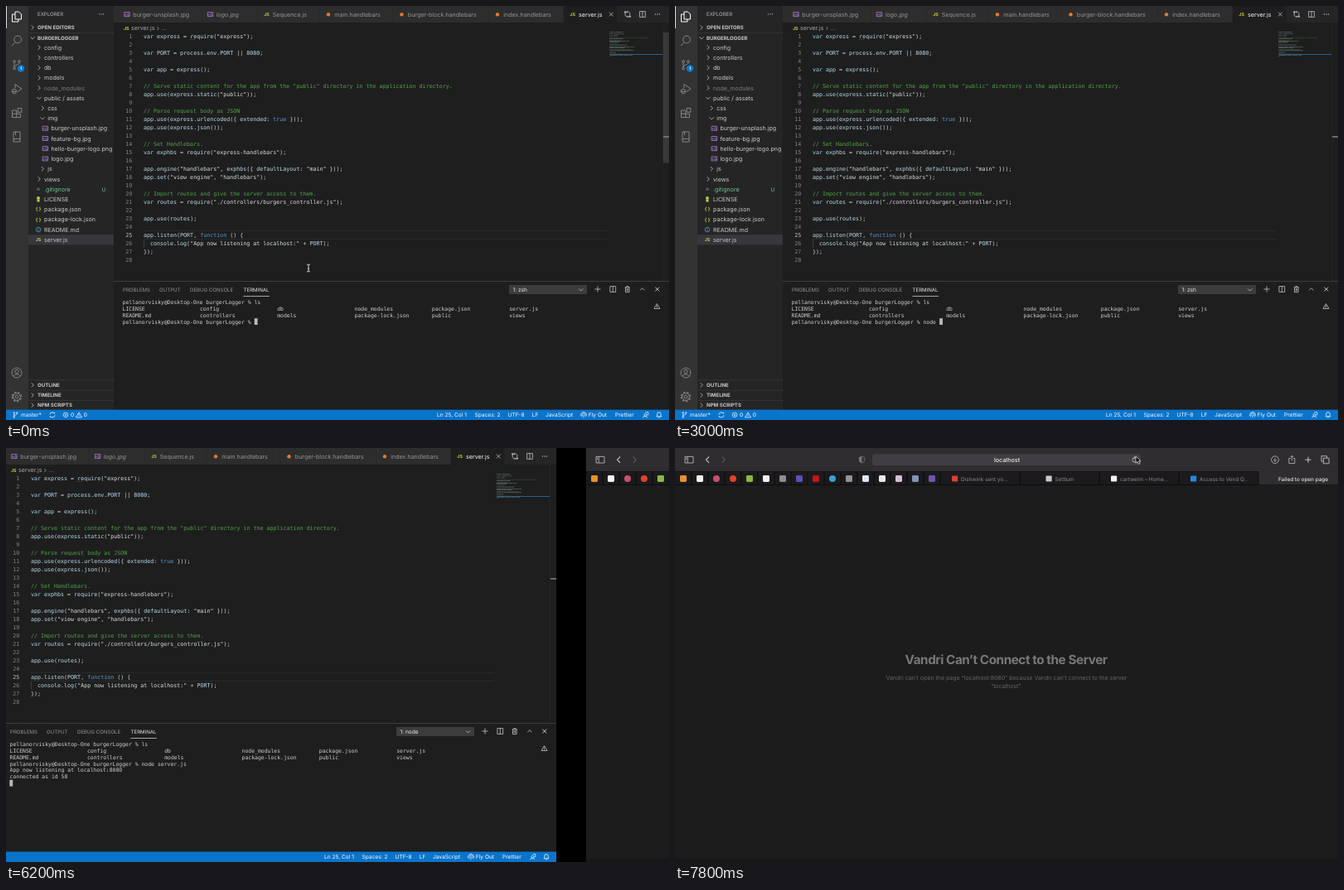
Write an HTML page that moves like this. It is 800x500 px and loops after 8 s.

```html
<!DOCTYPE html>
<html lang="en">
<head>
<meta charset="utf-8">
<title>Starting a local server</title>
<style>
  html, body { margin: 0; width: 100%; height: 100%; overflow: hidden; background: #000; }
  svg { display: block; width: 100vw; height: 100vh; }
  text { font-family: Inter, "Open Sans", sans-serif; white-space: pre; text-rendering: geometricPrecision; }
  .mono { font-family: "DejaVu Sans Mono", "Liberation Mono", monospace; }
</style>
</head>
<body>
<svg id="stage" viewBox="0 0 800 500" xmlns="http://www.w3.org/2000/svg"></svg>
<script>
const LOOP = 8000, STEP = 200, PITCH = 836;
const USER = 'pellanorvisky@Desktop-One burgerLogger % ';
const COMMAND = 'node server.js';
const CHAR = 3.888, ROW = 7.87, TERM_X = 140.6, TERM_Y = 357.6;

// Drawing helpers; text is placed by the vertical middle of its capitals.
const rect = (x, y, w, h, fill, more = '') =>
  `<rect x="${x}" y="${y}" width="${w}" height="${h}" fill="${fill}" ${more}/>`;
const text = (x, y, s, size = 7.1, fill = '#ccc', more = '') =>
  `<text x="${x}" y="${(y + size * .36).toFixed(2)}" font-size="${size}" fill="${fill}" ${more}>${s}</text>`;
const icon = (x, y, d, color = '#c5c5c5', w = .8, more = '') =>
  `<path transform="translate(${x} ${y})" d="${d}" fill="none" stroke="${color}" stroke-width="${w}" ${more}/>`;
const dot = (x, y, r, fill, more = '') => `<circle cx="${x}" cy="${y}" r="${r}" fill="${fill}" ${more}/>`;
const ring = r => `M${-r} 0a${r} ${r} 0 1 0 ${2 * r} 0a${r} ${r} 0 1 0 ${-2 * r} 0`;
const BOLD = 'font-weight="700"', MONO = 'class="mono"', MID = 'text-anchor="middle"';

const P = {
  right: 'M-1.3-2.6L1.3 0L-1.3 2.6', down: 'M-2.6-1.3L0 1.3L2.6-1.3', up: 'M-2.6 1.3L0-1.3L2.6 1.3',
  plus: 'M-3.6 0H3.6M0-3.6V3.6', close: 'M-2.4-2.4L2.4 2.4M2.4-2.4L-2.4 2.4',
  split: 'M-3.4-3.4H3.4V3.4H-3.4ZM0-3.4V3.4',
  trash: 'M-3-2.4H3M-1-2.4V-3.6H1V-2.4M-2.3-2.4V3.4H2.3V-2.4M-.7-1V2M.7-1V2',
  warn: 'M0-3L3.5 3H-3.5ZM0-1V1.2M0 1.8V2.4',
  files: 'M-2-6H2.5L5.5-3V3H-2ZM-2-3H-5.5V6H2V3',
  search: 'M-2.2 2.2L-6 6M-3.3-1.6a4.4 4.4 0 1 0 8.8 0a4.4 4.4 0 1 0-8.8 0',
  branch: 'M-3-2.5V3M3-2.5C3 .5-3-.5-3 3M-4.3-4a1.4 1.4 0 1 0 2.8 0a1.4 1.4 0 1 0-2.8 0M1.6-4a1.4 1.4 0 1 0 2.8 0a1.4 1.4 0 1 0-2.8 0M-4.3 4.5a1.4 1.4 0 1 0 2.8 0a1.4 1.4 0 1 0-2.8 0',
  debug: 'M-2-1V-5.5L6 0L0 4M-5 2.5a2 2.4 0 0 1 4 0V4a2 2 0 0 1-4 0ZM-6.3 1.5L-5 2.4M-6.5 3.5H-1M.2 1.5L-1 2.4',
  blocks: 'M-5.5-3H-.3V5.5H-5.5ZM-5.5 1.2H4.5V5.5H-.3M1.2-5.5H5.8V-.8H1.2Z',
  book: 'M-4-6H4V6H-4ZM-4 2.5H4M-1.5-6V-2',
  person: ring(6) + 'M-2.2-1.5a2.2 2.2 0 1 0 4.4 0a2.2 2.2 0 1 0-4.4 0M-4 4.3C-3.4 1 3.4 1 4 4.3',
  picture: 'M-3.2-2.6H3.2V2.4H-3.2ZM-3 1.5L-1-.4L.8 1.4L3 .4',
  sync: 'M-3-.5A3 3 0 0 1 2.6-1.5V-3M3 .5A3 3 0 0 1-2.6 1.5V3',
  pane: 'M-5-3.8H5V3.8H-5ZM-1.8-3.8V3.8M-4-2H-2.8M-4-.6H-2.8',
  beam: 'M-2-4.5Q0-4.5 0-3.2Q0-4.5 2-4.5M0-3.2V3.2M-2 4.5Q0 4.5 0 3.2Q0 4.5 2 4.5M-1 .8H1',
  arrow: 'M0 0V8.4L2 6.6L3.4 9.6L4.9 8.9L3.5 6H6Z'
};
const more = (x, y, c = '#c5c5c5') => [-2.5, 0, 2.5].map(d => dot(x + d, y, .65, c)).join('');

function fileIcon(kind, x, y) {
  if (kind === 'img') return icon(x, y, P.picture, '#a074c4', .9) + dot(x + 1.2, y - 1, .7, '#a074c4');
  if (kind === 'js') return text(x, y, 'JS', 5.4, '#cbcb41', `${BOLD} ${MID}`);
  if (kind === 'json') return text(x, y - .3, '{ }', 5.6, '#cbcb41', `${BOLD} ${MID}`);
  if (kind === 'hbs') return dot(x, y, 2.2, '#e37933');
  if (kind === 'info') return icon(x, y, ring(2.8) + 'M0-.5V1.7M0-1.7V-1', '#519aba', .8);
  if (kind === 'key') return dot(x, y - 1.5, 1.9, '#cbcb41') + rect(x - 1.5, y + .3, 3, 2.8, '#cbcb41');
  return dot(x, y, 2, '#41535b');
}

function activityBar() {
  const list = [['files', 13, '#fff'], ['search', 42], ['branch', 71], ['debug', 100], ['blocks', 129], ['book', 158], ['person', 443]];
  let s = rect(0, 0, 27, 488, '#333333') + rect(0, 0, 1, 27, '#ddd');
  for (const [name, y, c = '#858585'] of list) s += icon(13, y, P[name], c, 1);
  s += icon(13, 472, ring(1.9) + ring(4.4), '#858585', 1) + icon(13, 472, ring(5.5), '#858585', 1.5, 'stroke-dasharray="2.2 2.12"');
  return s + dot(18, 75.5, 4.2, '#0a7ad0') + text(18, 75.5, '1', 5, '#fff', `${BOLD} ${MID}`);
}

function sidebar() {
  const rows = [
    [0, '>', 'config'], [0, '>', 'controllers'], [0, '>', 'db'], [0, '>', 'models'], [0, '>', 'node_modules', '#7d7d7d'],
    [0, 'v', 'public / assets'], [1, '>', 'css'], [1, 'v', 'img'], [2, 'img', 'burger-unsplash.jpg'], [2, 'img', 'feature-bg.jpg'],
    [2, 'img', 'hello-burger-logo.png'], [2, 'img', 'logo.jpg'], [1, '>', 'js'], [0, '>', 'views'], [0, 'git', '.gitignore', '#73c991'],
    [0, 'key', 'LICENSE'], [0, 'json', 'package.json'], [0, 'json', 'package-lock.json'], [0, 'info', 'README.md'], [0, 'js', 'server.js']];
  let s = rect(27, 0, 103, 488, '#252526') + rect(27, 276.2, 103, 12.2, '#37373d');
  s += text(38, 10.2, 'EXPLORER', 6.1, '#bbb') + more(115, 9.8);
  s += icon(32, 26, P.right) + text(38, 26, 'OPEN EDITORS', 6.1, '#ccc', BOLD) + rect(27, 32, 103, .6, '#3c3c3c');
  s += icon(32, 38.6, P.down) + text(38, 38.6, 'BURGERLOGGER', 6.1, '#ccc', BOLD);
  rows.forEach(([depth, kind, name, color], i) => {
    const y = 50.1 + i * 12.22, x = 46 + depth * 4.2;
    s += kind === '>' || kind === 'v' ? icon(x - 6, y, kind === 'v' ? P.down : P.right) : fileIcon(kind, x - 7, y);
    s += text(x, y, name, 7.1, color);
  });
  s += text(117.8, 221.2, 'U', 6.4, '#73c991', MID);
  ['OUTLINE', 'TIMELINE', 'NPM SCRIPTS'].forEach((name, i) => {
    const y = 457.8 + i * 12.2;
    s += rect(27, y - 6.2, 103, .6, '#3f3f40') + icon(32, y, P.right) + text(38, y, name, 6.1, '#ccc', BOLD);
  });
  return s;
}

const CODE = `var express = require("express");

var PORT = process.env.PORT || 8080;

var app = express();

// Serve static content for the app from the "public" directory in the application directory.
app.use(express.static("public"));

// Parse request body as JSON
app.use(express.urlencoded({ extended: true }));
app.use(express.json());

// Set Handlebars.
var exphbs = require("express-handlebars");

app.engine("handlebars", exphbs({ defaultLayout: "main" }));
app.set("view engine", "handlebars");

// Import routes and give the server access to them.
var routes = require("./controllers/burgers_controller.js");

app.use(routes);

app.listen(PORT, function () {
  console.log("App now listening at localhost:" + PORT);
});
`.split('\n');

const paint = line => line.replace(/(\/\/.*)|("[^"]*")|\b(function|true)\b|\b(var)\b|([(){};=|+,]+)/g,
  (m, comment, str, word, decl) => {
    const c = comment ? '#4fa548' : str ? '#d9e0e2' : word ? '#569cd6' : decl ? '#9cd3f0' : '#d4d4d4';
    return `<tspan fill="${c}">${m}</tspan>`;
  });

function tabs() {
  const list = [[130, 146, 'img', 'burger-unsplash.jpg'], [237, 246.5, 'img', 'logo.jpg'], [304, 314.5, 'js', 'Sequence.js'],
    [378, 389, 'hbs', 'main.handlebars'], [467, 477.5, 'hbs', 'burger-block.handlebars'],
    [583, 593, 'hbs', 'index.handlebars'], [673, 683.7, 'js', 'server.js']];
  let s = rect(130, 0, 670, 20, '#252526');
  list.forEach(([left, x, kind, name], i) => {
    const on = i === 6, end = on ? 738 : list[i + 1][0];
    s += rect(left, 0, end - left - .6, 20, on ? '#1e1e1e' : '#2d2d2d') + fileIcon(kind, x, 10.2);
    s += text(x + 7.3, 10.2, name, 7.1, on ? '#fff' : '#969696', i === 1 ? 'font-style="italic"' : '');
  });
  s += icon(730.3, 10, P.close) + icon(768, 10, P.split) + more(786, 10);
  return s + icon(750, 10, 'M-2.8-1.5V1.5Q-2.8 3 1 3M2.8 1.5V-1.5Q2.8-3-1-3M0 1.8L1.2 3L0 4.2M0-4.2L-1.2-3L0-1.8') +
    dot(747.2, 7.4, 1.2, '#c5c5c5') + dot(752.8, 12.6, 1.2, '#c5c5c5');
}

function editor() {
  let s = rect(130, 0, 670, 488, '#1e1e1e') + tabs();
  s += fileIcon('js', 145.3, 26.8) + text(151, 26.8, 'server.js', 7.1, '#a9a9a9') + icon(183.3, 27, 'M-1-2L1 0L-1 2', '#a9a9a9', .7) + text(187.5, 26, '...', 7.1, '#a9a9a9');
  s += rect(166, 271.3, 559, .7, '#303030') + rect(166, 281.2, 559, .7, '#303030') + rect(166.2, 282, .6, 9.6, '#505050');
  CODE.forEach((line, i) => {
    const y = 36.9 + i * 10;
    s += text(152.2, y, i + 1, 6.67, i === 24 ? '#c6c6c6' : '#858585', `${MONO} text-anchor="end"`);
    if (!line) return;
    s += text(166, y, paint(line), 6.67, '#b9def0', MONO);
    const tint = line.startsWith('//') ? '#4c7a45' : '#8d9ba3';
    line.replace(/\S+/g, (word, k) => {
      s += rect(728 + k * .5, (31.2 + i * 1.11).toFixed(2), word.length * .5, .7, tint, 'opacity=".6"');
    });
  });
  s += [222.8, 225, 227.2].map(x => dot(x, 40.6, .45, '#aaa')).join('');
  s += rect(728, 58, 64, 1, '#2b5f8c') + rect(792.6, 20, .5, 312, '#2f2f2f') + rect(793, 157.4, 7, 1.1, '#a8a8a8');
  return s + rect(793, 32, 7, 157.5, '#797979', 'id="slider"');
}

function panel() {
  let s = rect(130, 332.2, 670, .7, '#4b4b4b');
  [[141, 'PROBLEMS'], [185, 'OUTPUT'], [222, 'DEBUG CONSOLE'], [286.6, 'TERMINAL']].forEach(([x, name], i) => {
    s += text(x, 343, name, 6.1, i === 3 ? '#e7e7e7' : '#969696');
  });
  s += rect(286.4, 350, 31.5, .7, '#e0e0e0') + rect(607, 337, 94, 11, '#3c3c3c');
  s += text(611.5, 342.6, '1: zsh', 6.6, '#f0f0f0', 'id="shell"') + icon(693.7, 342.7, P.down);
  s += icon(714, 342, P.plus) + icon(732.3, 342, P.split) + icon(749.8, 342.2, P.trash) + icon(767.8, 342, P.up) + icon(785.8, 342, P.close, '#c5c5c5', 1) + icon(785.5, 362.5, P.warn);
  const line = (row, col, str, id = '') => text((TERM_X + col * CHAR).toFixed(2), TERM_Y + row * ROW, str, 6.457, '#d0d0d0', `${MONO} ${id}`);
  s += line(0, 0, USER + 'ls');
  ['LICENSE config db node_modules package.json server.js', 'README.md controllers models package-lock.json public views']
    .forEach((r, i) => r.split(' ').forEach((name, k) => s += line(i + 1, k * 24, name)));
  s += line(3, 0, USER, 'id="prompt"') + line(4, 0, 'App now listening at localhost:8080', 'id="out1"') + line(5, 0, 'connected as id 58', 'id="out2"');
  return s + rect(0, 0, 3.9, 7.8, '#b8b8b8', 'id="block"');
}

function statusBar() {
  const y = 493.8, w = '#fff';
  let s = rect(0, 487.6, 800, 12.4, '#0a74cb');
  s += `<g transform="translate(11.5 ${y}) scale(.6)">${icon(0, 0, P.branch, w, 1.2)}</g>` + icon(56, y, P.sync, w);
  s += icon(72, y, ring(2.8) + 'M-1.2-1.2L1.2 1.2M1.2-1.2L-1.2 1.2', w, .7) + icon(88, y, P.warn, w, .7);
  for (const [x, t] of [[18, 'master*'], [78, '0'], [93.8, '0'], [520, 'Ln 25, Col 1'], [565.5, 'Spaces: 2'], [605.5, 'UTF-8'], [634.8, 'LF'], [651, 'JavaScript'], [702.8, 'Fly Out'], [735, 'Prettier']])
    s += text(x, y, t, 6.6, w);
  s += icon(697, y, 'M0-.5V3.5M-1.6 1.2A2 2 0 1 1 1.6 1.2M-2.4 2.4A3.4 3.4 0 1 1 2.4 2.4', w, .7);
  s += icon(771.5, y, ring(1.5) + 'M-3 3.4Q-3 1.8 0 1.6Q2 1.6 2.2 3.4M0-3.2H3.4V0H2', w, .7);
  return s + icon(788, y, 'M-3 2H3L2.2.8V-1A2.2 2.2 0 0 0-2.2-1V.8ZM-.8 3.1H.8', w, .8);
}

function browser() {
  let s = rect(0, 0, 800, 500, '#1c1c1c') + rect(0, 496, 800, 4, '#171718') + rect(0, 0, 800, 29, '#2f2d30') + rect(0, 28.6, 800, 15.8, '#1b1a1c');
  s += rect(0, 28.3, 704, .7, '#0c0c0d') + rect(0, 44, 800, .8, '#09090a') + rect(704, 28.3, 96, 16, '#2f2d30');
  s += rect(238, 7.3, 324, 14, '#403e42', 'rx="3"') + text(400.5, 14.4, 'localhost', 7.2, '#ececec', `${MID} font-weight="500"`);
  s += icon(17, 14.2, P.pane, '#b5b5b5', .9, 'stroke-linejoin="round"') + icon(39.3, 14.2, 'M1.8-3.7L-1.8 0L1.8 3.7', '#c2c2c2', 1.1) + icon(58.5, 14.2, 'M-1.8-3.7L1.8 0L-1.8 3.7', '#59575b', 1.1);
  s += icon(225.5, 14.2, 'M0-4L3.4-2.8V0Q3.4 2.8 0 4Q-3.4 2.8-3.4 0V-2.8Z', '#77757a');
  s += `<path d="M225.5 10.2V18.2Q222.1 17 222.1 14.2V11.4Z" fill="#77757a"/>`;
  s += icon(554.8, 14.4, 'M2.7-.6A2.8 2.8 0 1 1 .4-2.8M-.8-4.2L.8-2.8L-.8-1.4', '#c2c2c2', .8);
  s += icon(724, 14.2, ring(4.4) + 'M0-2.3V2M-1.8.4L0 2.2L1.8.4', '#bdbdbd') + icon(744.3, 14, 'M-1.5-1.5H-3.5V4.6H3.5V-1.5H1.5M0 1.5V-4.6M-1.8-3L0-4.8L1.8-3', '#bdbdbd');
  s += icon(764, 14.2, P.plus, '#c2c2c2', 1) + icon(784.5, 14.2, 'M-2-2H4.6V4.6H-2ZM-2 2H-4.5V-4.5H2V-2', '#bdbdbd', .9);
  const marks = ['#e8912d', '#f2f2f2', '#c9506f', '#e2432a', '#8db543', '#f4f4f4', '#8e8e90', '#5b50b5', '#c4151c',
    '#3a9fd0', '#949497', '#dfe5f2', '#e9e9e9', '#d9bdd4', '#7f95b5', '#6f55ad'];
  marks.forEach((c, i) => {
    const x = 10 + i * 20;
    s += (i === 2 || i === 3 || i === 9 ? dot(x, 37, 4, c) : rect(x - 4, 33, 8, 8, c, 'rx="1.4"')) + rect(x + 9.7, 29, .7, 15, '#050505');
  });
  [['Dishwink sent yo...', 345, '#d93f35'], ['Settlum', 458.5, '#c8c8cc'], ['cartwelm – Home...', 537, '#f2f2f2'], ['Access to Vend Q...', 633, '#2a86e0']].forEach(([name, x, c], i) => {
    s += rect(x - 11, 33.4, 7.2, 7.2, c, 'rx="1"') + text(x, 37.2, name, 6.4, '#8d8b90') + rect(415.7 + i * 96, 29, .7, 15, '#050505');
  });
  s += text(758, 37.2, 'Failed to open page', 6.4, '#e6e6e6', `${MID} font-weight="500"`);
  s += text(399.6, 255.6, 'Vandri Can’t Connect to the Server', 15.3, '#787878', `${MID} ${BOLD} letter-spacing="-.45"`);
  s += text(400, 277.2, 'Vandri can’t open the page “localhost:8080” because Vandri can’t connect to the server', 7, '#666', MID);
  return s + text(400, 287.2, '“localhost”.', 7, '#666', MID);
}

const stage = document.getElementById('stage');
stage.innerHTML = `<g id="desk">${rect(0, 0, 800, 500, '#1e1e1e') + activityBar() + sidebar() + editor() + panel() + statusBar()}</g>
  <g id="page">${browser()}</g>
  <path id="beam" d="${P.beam}" fill="none" stroke="#e4e4e4" stroke-width=".9"/>
  <path id="arrow" d="${P.arrow}" fill="#000" stroke="#fff" stroke-width=".7"/>`;

const el = id => document.getElementById(id);
const show = (id, on) => el(id).setAttribute('visibility', on ? 'visible' : 'hidden');
const move = (id, x, y) => el(id).setAttribute('transform', `translate(${x.toFixed(2)} ${y.toFixed(2)})`);

// Points are [time, x, y]; motion between them is smoothed.
function along(points, t) {
  const i = points.findIndex(p => p[0] > t);
  if (i < 1) return points[i ? points.length - 1 : 0].slice(1);
  const [a, b] = [points[i - 1], points[i]];
  const k = (t - a[0]) / (b[0] - a[0]), e = k * k * (3 - 2 * k);
  return [a[1] + (b[1] - a[1]) * e, a[2] + (b[2] - a[2]) * e];
}
const latest = (list, t) => list.reduce((v, [at, n]) => t >= at ? n : v, 0);

const beamPoints = [[0, 365, 316.5], [1000, 377, 478], [1200, 376, 416]];
const arrowPoints = [[7000, 384, 180], [7200, 392.5, 33], [7400, 468, 22], [7600, 545, 12], [7800, 556, 9.8]];
const typed = [[2400, 1], [2600, 2], [2800, 4], [3000, 5], [3200, 6], [3400, 8], [3600, 11], [3800, 14]];
const rowAt = [[0, 3], [4200, 4], [5000, 5], [5200, 6]];

function draw(time) {
  const t = Math.floor(time / STEP) * STEP;
  const n = latest(typed, t), row = latest(rowAt, t);
  el('prompt').textContent = USER + COMMAND.slice(0, n);
  el('shell').textContent = t < 5000 ? '1: zsh' : '1: node';
  show('out1', row > 4);
  show('out2', row > 5);
  move('block', TERM_X - .3 + (row === 3 ? (USER.length + n) * CHAR : 0), TERM_Y - 4 + row * ROW);
  el('slider').setAttribute('opacity', Math.max(0, .28 * (1 - t / 600)).toFixed(2));

  const left = t < 6200 ? PITCH : t >= 7000 ? 0 : 700 * Math.exp(-(t - 6200) / 89.5);
  move('desk', left - PITCH, 0);
  move('page', left, 0);

  show('beam', t < 2400);
  move('beam', ...along(beamPoints, t));
  show('arrow', t >= 7000);
  move('arrow', ...along(arrowPoints, t));
}

const start = performance.now();
function tick() {
  draw((performance.now() - start) % LOOP);
  requestAnimationFrame(tick);
}
tick();
</script>
</body>
</html>
```
